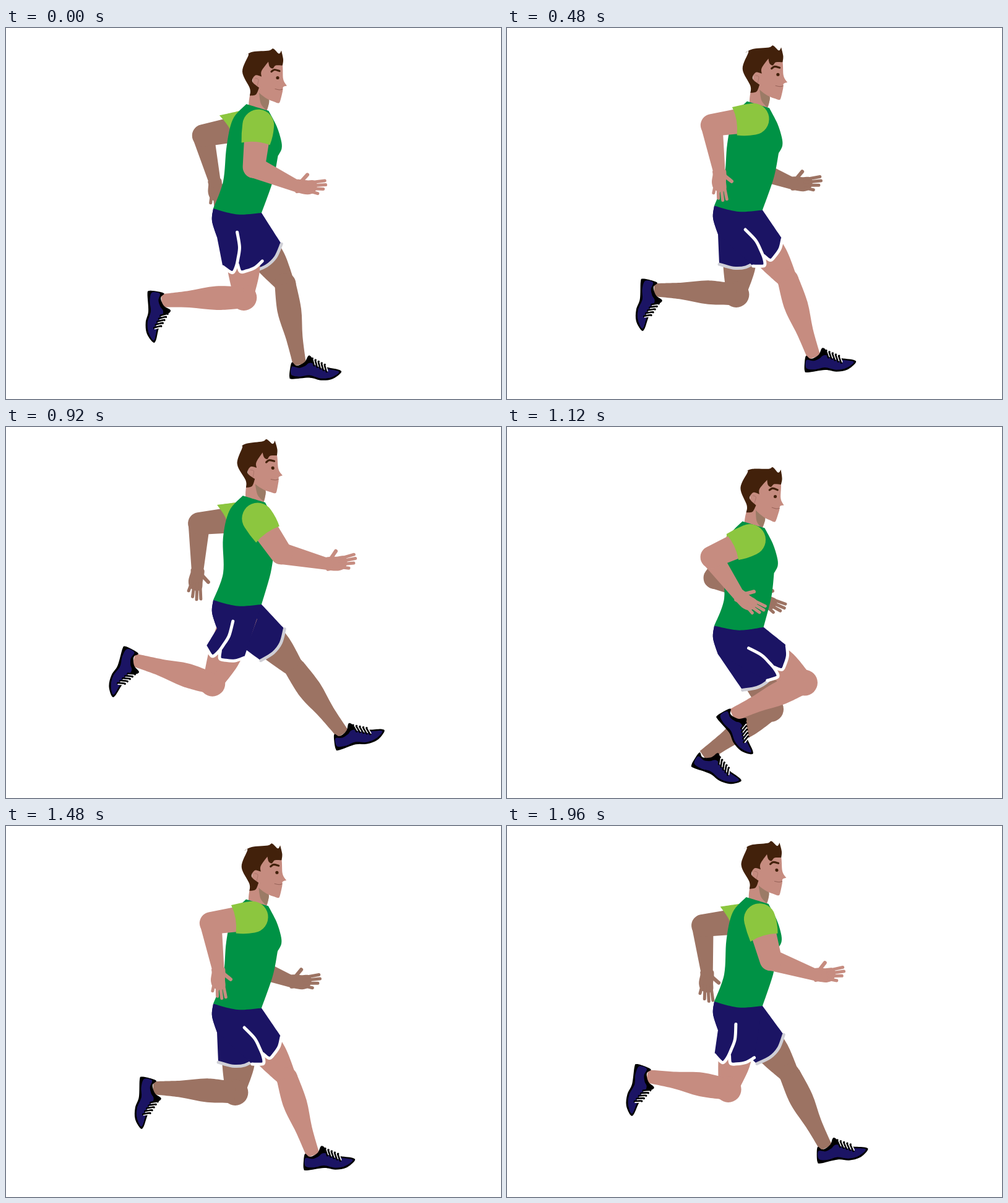
An HTML page with a canvas for the animation above (2 s loop, 800x600 px).

```html
<!DOCTYPE html>
<html lang="en">
<head>
<meta charset="utf-8">
<title>Runner</title>
<style>
  html, body { margin: 0; width: 100%; height: 100%; overflow: hidden; background: #fff; }
  canvas { display: block; }
</style>
</head>
<body>
<canvas id="stage" width="800" height="600"></canvas>
<script>
const ctx = document.getElementById('stage').getContext('2d');
const CYCLE = 1000, HALF = 500, STEP = 40;
const SKIN = '#c68c80', SHADE = '#9c7363', SHIRT = '#009245', SLEEVE = '#8cc63f',
      NAVY = '#1b1464', HAIR = '#42210b', TRIM = '#cfcfd6';
const THIGH = 124, SHIN = 127, UPPER = 68, FORE = 77;

// Key poses shared by both sides, half a cycle apart.
// time, thigh, shin and foot angles
const GAIT = [
  [0, 88, 178, 91],
  [180, 13, 138, 33],
  [280, -8, 88, 0],
  [420, 46, 54, -15],
  [500, 55, 80, 0],
  [600, 61, 137, 16],
  [680, 97, 162, 53],
  [780, 153, 153, 94],
  [920, 112, 197, 110]
];
// time, upper arm and forearm angles
const SWING = [
  [0, 96, 24],
  [180, 170, 76],
  [280, 155, 121],
  [420, 174, 92],
  [500, 169, 76],
  [680, 99, -3],
  [780, 44, -35],
  [920, 56, 13]
];

const clamp = v => Math.max(0, Math.min(1, v));
const mix = (a, b, k) => [a[0] + (b[0] - a[0]) * k, a[1] + (b[1] - a[1]) * k];
const add = (p, x, y) => [p[0] + x, p[1] + y];
const same = (a, b) => a[0] === b[0] && a[1] === b[1];

// Point at u along a direction and v towards its front side
function at(o, deg, u, v = 0) {
  const a = deg * Math.PI / 180, c = Math.cos(a), s = Math.sin(a);
  return [o[0] + u * c + v * s, o[1] + u * s - v * c];
}

// Periodic cubic interpolation through key poses
function sample(rows, time) {
  const n = rows.length, t = time % CYCLE;
  let i = n - 1;
  while (rows[i][0] > t) i--;
  const key = k => rows[(k + n) % n];
  const when = k => key(k)[0] + Math.floor(k / n) * CYCLE;
  const h = when(i + 1) - when(i), h0 = when(i) - when(i - 1), h2 = when(i + 2) - when(i + 1);
  const s = (t - when(i)) / h, s2 = s * s, s3 = s2 * s;
  return rows[i].slice(1).map((b, j) => {
    const a = key(i - 1)[j + 1], c = key(i + 1)[j + 1], d = key(i + 2)[j + 1];
    const k0 = (b - a) / h0, k1 = (c - b) / h, k2 = (d - c) / h2;
    const m1 = (k0 * h + k1 * h0) / (h0 + h), m2 = (k1 * h2 + k2 * h) / (h + h2);
    return b * (2 * s3 - 3 * s2 + 1) + c * (3 * s2 - 2 * s3)
         + h * (m1 * (s3 - 2 * s2 + s) + m2 * (s3 - s2));
  });
}

// Smooth curve through points; a repeated point makes a corner
function trace(pts, closed) {
  const n = pts.length;
  const p = i => closed ? pts[(i + n) % n] : pts[Math.max(0, Math.min(n - 1, i))];
  ctx.beginPath();
  ctx.moveTo(...pts[0]);
  for (let i = 0; i < (closed ? n : n - 1); i++) {
    const [a, b, c, d] = [p(i - 1), p(i), p(i + 1), p(i + 2)];
    if (same(b, c)) continue;
    ctx.bezierCurveTo(b[0] + (c[0] - a[0]) / 6, b[1] + (c[1] - a[1]) / 6,
                      c[0] - (d[0] - b[0]) / 6, c[1] - (d[1] - b[1]) / 6, c[0], c[1]);
  }
}
function blob(pts, color) {
  trace(pts, true);
  ctx.fillStyle = color;
  ctx.fill();
}
function line(pts, color, width) {
  trace(pts, false);
  ctx.strokeStyle = color;
  ctx.lineWidth = width;
  ctx.lineCap = ctx.lineJoin = 'round';
  ctx.stroke();
}
function disc(p, r, color) {
  ctx.beginPath();
  ctx.arc(p[0], p[1], r, 0, 7);
  ctx.fillStyle = color;
  ctx.fill();
}
function local(o, deg, draw) {
  ctx.save();
  ctx.translate(o[0], o[1]);
  ctx.rotate(deg * Math.PI / 180);
  draw();
  ctx.restore();
}

// Limb outline from half-widths at even steps along its length
function limb(o, deg, len, front, back, color) {
  const side = (widths, sign) => widths.map((w, i) => at(o, deg, len * i / (widths.length - 1), w * sign));
  const a = side(front, 1), b = side(back, -1).reverse();
  blob([a[0], ...a, a[a.length - 1], b[0], ...b, b[b.length - 1]], color);
}
function taper(a, ra, b, rb, color) {
  const dir = Math.atan2(b[1] - a[1], b[0] - a[0]);
  const q = Math.acos((ra - rb) / Math.hypot(b[0] - a[0], b[1] - a[1]));
  ctx.beginPath();
  ctx.arc(a[0], a[1], ra, dir + q, dir - q + 2 * Math.PI);
  ctx.arc(b[0], b[1], rb, dir - q, dir + q);
  ctx.fillStyle = color;
  ctx.fill();
}

function shoe() {
  blob([[-11, 2], [-14, 12], [-15, 26], [-10, 29], [18, 27], [36, 31], [54, 29], [68, 19],
        [65, 14], [43, 9], [26, 0], [19, -8], [15, -8], [10, 1], [2, 6], [-5, 7]], '#000');
  blob([[-11, 9], [-12, 22], [2, 25], [18, 23], [36, 28], [53, 26], [65, 17],
        [44, 12], [20, 3], [10, 8], [0, 11]], NAVY);
  for (let i = 0; i < 5; i++) {
    const x = 22 + 5 * i, y = 1 + 2.5 * i;
    line([[x, y - 5], [x + 3, y + 6]], '#000', 3.5);
    line([[x + 2, y - 4], [x + 4.5, y + 5]], '#fff', 1.7);
  }
}

// The shin foreshortens for a moment as the knee drives forward
function leg(hip, [thigh, shin, foot], phase, color) {
  const len = SHIN - 24 * Math.exp(-(((phase % CYCLE - 195) / 60) ** 2));
  const knee = at(hip, thigh, THIGH), ankle = at(knee, shin, len);
  limb(hip, thigh, THIGH, [28, 29, 27, 16], [28, 28, 24, 16], color);
  disc(knee, 16 + 5 * clamp((shin - thigh) / 90), color);
  limb(knee, shin, len + 6, [17, 18.5, 13, 11], [17, 20, 14, 10], color);
  local(ankle, foot, shoe);
}

function shortsLeg(hip, H, R, thigh, hem) {
  const pts = hem.map(([u, v]) => at(hip, thigh, u, v));
  const first = pts[0], last = pts[pts.length - 1];
  const back = clamp((thigh - 112) / 38);
  const low = mix(add(H, 6, 46), mix(H, last, .7), back);
  const high = mix(add(H, -2, 20), mix(H, last, .35), back);
  blob([H, H, R, R, first, first, ...pts.slice(1, -1), last, last, low, low, high], NAVY);
  return pts;
}
function farShorts(hip, H, R, thigh) {
  const b = 9 * clamp((thigh - 85) / 65), f = 5 * clamp((45 - thigh) / 30);
  line(shortsLeg(hip, H, R, thigh,
    [[68 - 1.4 * b + f, 32], [80 - b + f, 12], [83 - b + f, -8], [78 - b / 2 + f, -31]]), TRIM, 5);
}
function nearShorts(hip, H, R, thigh) {
  const front = [[66, 32], [76, 20], [81, 6], [82, -4], [70, -8]];
  const rear = [[73, -32], [82, -20], [82, -15], [72, -10]];
  const trim = pts => line(pts.map(([u, v]) => at(hip, thigh, u, v)), '#fff', 5);
  shortsLeg(hip, H, R, thigh, [...front, ...rear.slice().reverse()]);
  trim(front);
  trim([...rear, [60, -7], [42, -4], [18, -7]]);
}

function hand(color) {
  blob([[-4, -9], [5, -11], [16, -9], [28, -8], [32, 0], [27, 11], [16, 14], [3, 11], [-4, 9]], color);
  line([[7, -8], [12, -13], [17, -18]], color, 6);
  for (let i = 0; i < 4; i++) {
    line([[20, 4.7 * i - 5], [46 - 2.6 * (i - .7) ** 2, 6.7 * i - 7]], color, 5);
  }
}
function arm(shoulder, [upper, fore], phase, color, sleeve) {
  const elbow = at(shoulder, upper, UPPER), wrist = at(elbow, fore, FORE);
  const flex = 12 + 15 * Math.cos(2 * Math.PI * (phase - 20) / CYCLE);
  local(wrist, fore - flex, () => hand(color));
  taper(elbow, 17.5, wrist, 9.5, color);
  taper(shoulder, 21.5, elbow, 18, color);
  local(shoulder, upper, () => sleeve(upper));
}
function nearSleeve() {
  ctx.beginPath();
  ctx.arc(0, 0, 25.5, Math.PI / 2, Math.PI * 1.5);
  ctx.quadraticCurveTo(16, -26, 30, -22);
  ctx.quadraticCurveTo(24, 2, 31, 24);
  ctx.quadraticCurveTo(16, 26, 0, 25.5);
  ctx.fillStyle = SLEEVE;
  ctx.fill();
}
function farSleeve(upper) {
  const tip = [36, 27 * clamp((upper - 110) / 50)];
  blob([[0, 28], [0, 28], tip, tip, [25, 6], [20, -18], [20, -18], [0, -20]], SLEEVE);
}

function head() {
  blob([[-41, 18], [-46, 50], [-30, 58], [-18, 54], [-14, 34], [-20, 15]], SKIN);
  blob([[-30, 24], [-30, 24], [-14, 35], [-18, 53], [-18, 53], [-27, 42]], '#9b7b66');
  blob([[7, -24], [9, 2], [15, 13], [15, 13], [9, 15], [8, 22], [4, 38], [1, 41],
        [-5, 39], [-17, 34], [-30, 24], [-40, 10], [-38, -8], [-26, -26], [-6, -30]], SKIN);
  blob([[-52, -36], [-52, -36], [-40, -42], [-14, -44], [-7, -47], [2, -39], [6, -44],
        [6, -44], [9, -30], [8, -20], [8, -20], [-3, -20], [-8, -15], [-13, -18],
        [-15, -26], [-15, -26], [-26, -11], [-26, -2], [-26, -2], [-36, -4], [-41, 6],
        [-30, 16], [-30, 16], [-35, 27], [-45, 29], [-45, 29], [-45, 17], [-57, -10], [-47, -37]], HAIR);
  line([[-36, 1], [-31, 3], [-33, 13]], '#a56f64', .8);
  line([[-10, -10], [-5, -13], [3, -11]], HAIR, 3.2);
  disc([0, 0], 2.6, HAIR);
  line([[-4, 18], [3, 19.5], [8, 18.5]], '#8d5a50', .9);
}

function torso(C, H, R) {
  const q = (x, y) => add(C, x, y);
  const hem = add(mix(H, R, .5), 0, 6), waist = add(mix(q(50, 90), R, .4), 3, 0);
  blob([C, C, q(36, 11), q(36, 11), q(49, 36), q(56, 58), q(57, 72), q(51, 84), q(51, 84),
        waist, R, R, hem, H, H, [351, H[1] - 44], q(-32, 69), q(-22, 25)], SHIRT);
}

function draw(t) {
  ctx.fillStyle = '#fff';
  ctx.fillRect(0, 0, 800, 600);

  // The body bounces once per stride
  const a = 2 * Math.PI * t / HALF, rise = Math.sin(a);
  const hemY = 294.2 + 3 * Math.cos(a) + 22.1 * rise - 5.2 * Math.cos(2 * a) - .7 * Math.sin(2 * a);
  const C = [384.5 + 4 * Math.cos(2 * a), hemY - 169], H = [335, hemY], hip = [380, hemY + 20];

  const t2 = t + HALF, near = sample(GAIT, t), far = sample(GAIT, t2);
  const swing = sample(SWING, t);
  const lift = Math.max(0, 45 - Math.min(near[0], far[0]));
  const R = add(H, 78 + .18 * lift, 7 - .5 * lift);
  const reach = swing[0] - 56;

  arm(add(C, -3, 38), sample(SWING, t2), t2, SHADE, farSleeve);
  leg(hip, far, t2, SHADE);
  farShorts(hip, H, R, far[0]);
  leg(hip, near, t, SKIN);
  nearShorts(hip, H, R, near[0]);
  local(add(C, 50.5 + 2.5 * rise, -42.5 + 2.5 * rise), 4 * rise, head);
  torso(C, H, R);
  arm(add(C, 24 - .12 * reach, 37 - .07 * reach), swing, t, SKIN, nearSleeve);
}

const start = performance.now();
function tick() {
  const t = performance.now() - start;
  draw(Math.floor(t / STEP) * STEP % CYCLE);
  requestAnimationFrame(tick);
}
tick();
</script>
</body>
</html>
```
